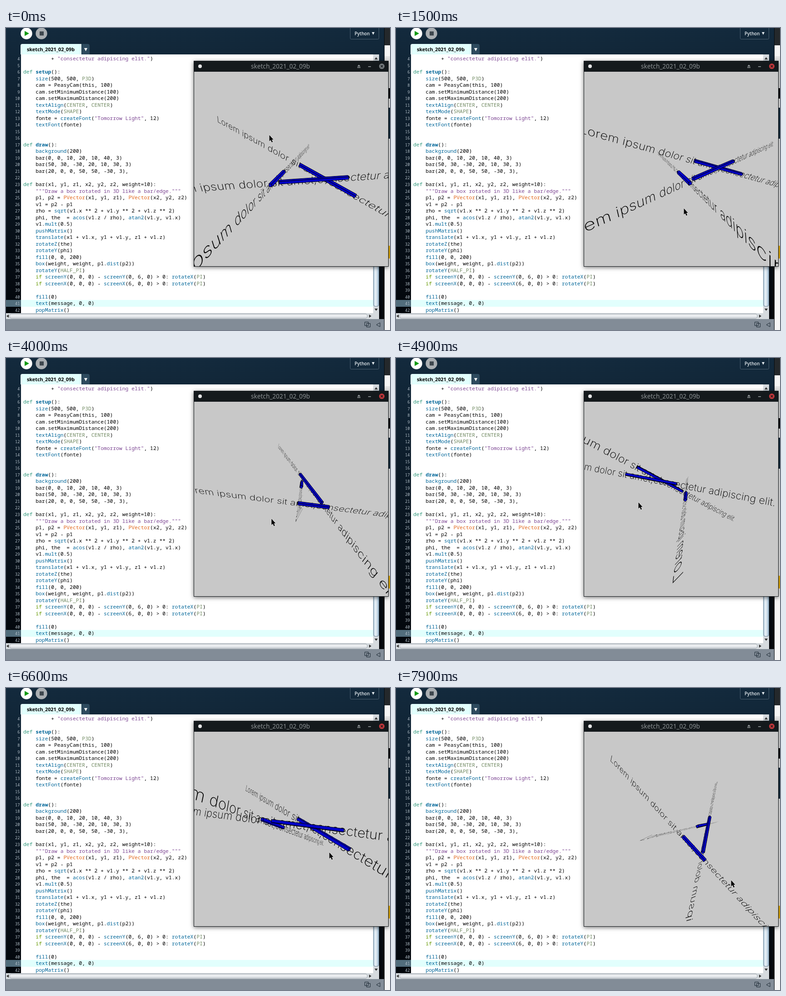
Recreate the animation shown at these times as an HTML page with a canvas. Size 845 px wide and 663 px high, loop 8 s.

```html
<!DOCTYPE html>
<html lang="en">
<head>
<meta charset="utf-8">
<title>Rotating bars with text</title>
<style>
  html, body { margin: 0; width: 100%; height: 100%; overflow: hidden; background: #020408; }
  #stage { position: relative; width: 845px; height: 663px; overflow: hidden; }
  svg { position: absolute; left: 0; top: 0; }
  text { white-space: pre; }
  .ui { font-family: "Open Sans", "Noto Sans", sans-serif; }
  .code { font: 11.35px "Noto Sans Mono", "DejaVu Sans Mono", monospace; }
  .num { font: 8.8px "Noto Sans Mono", "DejaVu Sans Mono", monospace; fill: #b4c0c9; text-anchor: end; }
  .str { fill: #7d4793; }
  .def { fill: #33997e; }
  .main { fill: #006699; font-weight: 700; }
  .if { fill: #669900; }
  .const { fill: #718a62; }
  .type { fill: #e2661a; }
  .fn { fill: #006699; }
  #win { position: absolute; left: 413px; top: 72px; width: 429px; height: 452px;
         background: #14191c; box-shadow: 0 2px 9px rgba(0, 0, 0, .55); }
  canvas { position: absolute; left: 1px; top: 24px; }
</style>
</head>
<body>
<div id="stage">
  <svg width="845" height="663">
    <defs>
      <linearGradient id="bg" x2="0" y2="1">
        <stop stop-color="#132a3d"/><stop offset="1" stop-color="#020408"/>
      </linearGradient>
      <linearGradient id="bar" x2="0" y2="1">
        <stop stop-color="#c3c8cd"/><stop offset=".4" stop-color="#f3f5f7"/><stop offset="1" stop-color="#c4cad0"/>
      </linearGradient>
      <linearGradient id="thumb">
        <stop stop-color="#a9c3d8"/><stop offset=".4" stop-color="#eef5fa"/><stop offset="1" stop-color="#9db9d0"/>
      </linearGradient>
    </defs>
    <rect width="833" height="663" fill="url(#bg)"/>

    <circle cx="45" cy="12" r="12.7" fill="#fff"/>
    <path d="M41 6.5V17.5L51 12Z" fill="#0f9a0f"/>
    <circle cx="78" cy="12" r="12.7" fill="#a9aeb2"/>
    <rect x="74" y="7.5" width="9" height="9" fill="#3d464d"/>
    <rect x="757.5" y="-4" width="63" height="28.5" rx="2" fill="none" stroke="#4d6273"/>
    <text class="ui" x="767" y="15.5" font-size="9.8" font-weight="600" fill="#e6ecf0">Python</text>
    <path d="M805 9h6l-3 6z" fill="#e6ecf0"/>

    <path d="M32 58V39q0-4 4-4H166V58Z" fill="#e2fffd"/>
    <text class="ui" x="46" y="50.5" font-size="10.8" font-weight="700">sketch_2021_02_09b</text>
    <path d="M167 35H180q4 0 4 4V58H167Z" fill="#2d4a5e"/>
    <path d="M172 44h7l-3.5 7z" fill="#fff"/>

    <rect x="33" y="58" width="775" height="568" fill="#fff"/>
    <rect x="0" y="597" width="33" height="15" fill="#526d7c"/>
    <rect x="33" y="597" width="775" height="15" fill="#e2fffd"/>
    <g id="code"></g>

    <rect x="808" y="58" width="13" height="568" fill="#d5dade"/>
    <rect x="808.5" y="72" width="12" height="539" rx="4" fill="url(#thumb)" stroke="#6f8798"/>
    <path d="M811 69h7l-3.5-5zM811 616h7l-3.5 5z" fill="#333"/>

    <rect x="0" y="626" width="821" height="13" fill="#d5dade"/>
    <rect x="8" y="627" width="787" height="11" rx="5" fill="url(#bar)" stroke="#a2aab1"/>
    <path d="M6 629v7l-5-3.5zM799 629v7l5-3.5z" fill="#333"/>
    <rect x="0" y="639" width="833" height="24" fill="#828c97"/>
    <g fill="none" stroke="#1d2a35">
      <path d="M789.5 645.5h8v8h-8zM793.5 648.5h8v8h-8zM823 647v9l-8-4.5z"/>
    </g>

    <rect x="833" y="0" width="12" height="663" fill="#f6f6f6"/>
    <rect x="833" y="0" width="12" height="38" fill="#24282b"/>
    <rect x="833" y="62" width="12" height="70" fill="#e4e4e4"/>
    <rect x="833" y="132" width="12" height="23" fill="#0b0d10"/>
    <rect x="833" y="175" width="12" height="68" fill="#10283b"/>
    <rect x="833" y="478" width="12" height="28" fill="#f2b90c"/>
    <path d="M832.5 0V663" stroke="#05090d"/>
  </svg>

  <div id="win">
    <svg width="429" height="24">
      <circle cx="14" cy="12" r="4" fill="#e4e4e4"/>
      <text x="191" y="17" text-anchor="middle" font-family="Noto Sans, Open Sans, sans-serif" font-size="13.6" fill="#8d9294">sketch_2021_02_09b</text>
      <path d="M360 12.5h7l-3.5-4zM360 14h7v1.5h-7zM384 12h6v1.5h-6z" fill="#9a9fa1"/>
      <circle id="close" cx="414" cy="12" r="6"/>
      <path d="M411.5 9.5l5 5m0-5l-5 5" stroke="#14191c" stroke-width="1.4"/>
    </svg>
    <canvas width="427" height="427"></canvas>
  </div>
</div>

<script>
const source = `         + "consectetur adipiscing elit.")

def setup():
    size(500, 500, P3D)
    cam = PeasyCam(this, 100)
    cam.setMinimumDistance(100)
    cam.setMaximumDistance(200)
    textAlign(CENTER, CENTER)
    textMode(SHAPE)
    fonte = createFont("Tomorrow Light", 12)
    textFont(fonte)


def draw():
    background(200)
    bar(0, 0, 10, 20, 10, 40, 3)
    bar(50, 30, -30, 20, 10, 30, 3)
    bar(20, 0, 0, 50, 50, -30, 3),

def bar(x1, y1, z1, x2, y2, z2, weight=10):
    """Draw a box rotated in 3D like a bar/edge."""
    p1, p2 = PVector(x1, y1, z1), PVector(x2, y2, z2)
    v1 = p2 - p1
    rho = sqrt(v1.x ** 2 + v1.y ** 2 + v1.z ** 2)
    phi, the  = acos(v1.z / rho), atan2(v1.y, v1.x)
    v1.mult(0.5)
    pushMatrix()
    translate(x1 + v1.x, y1 + v1.y, z1 + v1.z)
    rotateZ(the)
    rotateY(phi)
    fill(0, 0, 200)
    box(weight, weight, p1.dist(p2))
    rotateY(HALF_PI)
    if screenY(0, 0, 0) - screenY(0, 6, 0) > 0: rotateX(PI)
    if screenX(0, 0, 0) - screenX(6, 0, 0) > 0: rotateY(PI)

    fill(0)
    text(message, 0, 0)
    popMatrix()`;

// Syntax colouring
const kinds = ['str', 'def', 'main', 'if', 'const', 'type', 'fn'];
const token = /("""[^"]*"""|"[^"]*")|\b(def)\b|\b(setup|draw)\b|\b(if)\b|\b(CENTER|SHAPE|P3D|HALF_PI|PI)\b|\b(PVector)\b|\b(size|text|textAlign|textMode|textFont|createFont|background|sqrt|acos|atan2|mult|pushMatrix|popMatrix|translate|rotate[XYZ]|fill|box|dist|screen[XY])\b/g;
const paint = line => line.replace(/&/g, '&amp;').replace(/</g, '&lt;').replace(token, (word, ...groups) =>
  `<tspan class="${kinds[groups.findIndex(g => g !== undefined)]}">${word}</tspan>`);
document.getElementById('code').innerHTML = source.split('\n').map((line, i) => {
  const y = (71 + i * 14.526).toFixed(2);
  return `<text class="num" x="30.5" y="${y}">${i + 4}</text><text class="code" x="38" y="${y}">${paint(line)}</text>`;
}).join('');

// Vectors and quaternions [w, x, y, z]
const add = (a, b, k = 1) => a.map((v, i) => v + b[i] * k);
const dot = (a, b) => a.reduce((s, v, i) => s + v * b[i], 0);
const unit = a => { const n = Math.hypot(...a); return a.map(v => v / n); };
const cross = (a, b) => [a[1] * b[2] - a[2] * b[1], a[2] * b[0] - a[0] * b[2], a[0] * b[1] - a[1] * b[0]];
function mul([w, ...u], [s, ...v]) {
  return [w * s - dot(u, v), ...add(add(cross(u, v), v, w), u, s)];
}
function turn([w, ...u], v) {
  const t = cross(u, v);
  return add(add(v, t, 2 * w), cross(u, t), 2);
}
function slerp(a, b, k) {
  let c = dot(a, b);
  if (c < 0) { b = b.map(v => -v); c = -c; }
  if (c > .9999) return unit(add(a, add(b, a, -1), k));
  const th = Math.acos(c);
  return add(a.map(v => v * Math.sin((1 - k) * th) / Math.sin(th)), b, Math.sin(k * th) / Math.sin(th));
}

// Scene and camera
const DIST = 200, NEAR = 43.3, FOCAL = 369.8, CX = 213.5, CY = 213.5, LEFT = 414, TOP = 96;
const ends = [[0, 0, 10], [20, 10, 40], [50, 30, -30], [20, 10, 30], [20, 0, 0], [50, 50, -30]];
const bars = [0, 2, 4].map(i => {
  const span = add(ends[i + 1], ends[i], -1), along = unit(span);
  const the = Math.atan2(span[1], span[0]);
  const down = [-Math.sin(the), Math.cos(the), 0];
  return { mid: add(ends[i], span, .5), half: Math.hypot(...span) / 2, along, down, side: cross(down, along) };
});

// Stage positions of the six bar ends in each camera pose
const poses = [
  [611, 316, 581, 345, 753, 329, 602, 339, 647, 300, 769, 368],
  [621, 317, 648, 341, 743, 293, 653, 331, 657, 292, 762, 320],
  [634, 320, 701, 337, 696, 266, 691, 329, 655, 286, 709, 287],
  [636, 311, 636, 296, 531, 239, 634, 292, 616, 276, 505, 255],
  [609, 304, 547, 281, 688, 296, 564, 287, 629, 284, 678, 338],
  [614, 307, 607, 301, 756, 317, 621, 304, 656, 291, 773, 353],
  [633, 326, 679, 378, 687, 284, 674, 361, 661, 304, 688, 298]
].map(orient);

// Finds the orientation that puts the bar ends on the given marks
function orient(marks) {
  const size = ends.reduce((s, p) => s + dot(p, p), 0);
  let best, least = Infinity;
  for (let n = 0; n < 27; n++) {
    let q = unit([1, n % 3 - 1, Math.floor(n / 3) % 3 - 1, Math.floor(n / 9) - 1]), error;
    for (let step = 0; step < 160; step++) {
      let torque = [0, 0, 0];
      error = 0;
      ends.forEach((p, i) => {
        const e = turn(q, p), k = (DIST - e[2]) / FOCAL;
        const off = [(marks[2 * i] - LEFT - CX) * k - e[0], (marks[2 * i + 1] - TOP - CY) * k - e[1], 0];
        torque = add(torque, cross(e, off));
        error += dot(off, off);
      });
      q = unit(mul([1, ...torque.map(v => v / size / 2)], q));
    }
    if (error < least) { least = error; best = q; }
  }
  return best;
}

// [time, pose] and [time, x, y]
const camera = [[0, 0], [200, 0], [1500, 1], [2500, 2], [3300, 2], [3700, 2.12], [3800, 2.12],
  [4900, 3], [6000, 4], [7200, 5], [7900, 6]];
const pointer = [[0, 579, 235], [100, 596, 259], [200, 596, 259], [1500, 633, 396], [2500, 595, 361],
  [3800, 595, 361], [4900, 533, 317], [6000, 750, 388], [7200, 672, 334], [7900, 737, 422]];
function at(track, t) {
  const i = track.findIndex(k => k[0] > t);
  if (i < 0) return track[track.length - 1].slice(1);
  const a = track[i - 1], b = track[i];
  return add(a, add(b, a, -1), (t - a[0]) / (b[0] - a[0])).slice(1);
}

const ctx = document.querySelector('canvas').getContext('2d');
const closeButton = document.getElementById('close');
const message = 'Lorem ipsum dolor sit amet,consectetur adipiscing elit.';
const SCALE = 8, BASE = 4.3, GAP = .08;
const font = `200 ${12 * SCALE}px Inter, Roboto, sans-serif`;
ctx.font = font;
const glyphs = [...message].map(ch => ({ ch, w: ctx.measureText(ch).width / SCALE + GAP }));
const width = glyphs.reduce((s, g) => s + g.w, 0);

const project = e => {
  const k = FOCAL / (DIST - e[2]);
  return [CX + e[0] * k, CY + e[1] * k];
};

function drawText({ mid, along, down }) {
  const origin = project(mid);
  const face = (axis, i) => project(add(mid, axis, 6))[i] < origin[i] ? axis.map(v => -v) : axis;
  const ax = face(along.map(v => -v), 0), ay = face(down, 1);
  let x = -width / 2;
  for (const { ch, w } of glyphs) {
    const m = add(add(mid, ax, x + w / 2), ay, BASE - 3);
    x += w;
    if (DIST - m[2] < NEAR) continue;
    const slope = axis => add(project(add(m, axis, .5)), project(add(m, axis, -.5)), -1).map(v => v / SCALE);
    ctx.setTransform(...slope(ax), ...slope(ay), ...project(m));
    ctx.fillText(ch, (GAP - w) / 2 * SCALE, 3 * SCALE);
  }
  ctx.resetTransform();
}

function drawBox({ mid, half, along, down, side }) {
  const axes = [[side, 1.5], [down, 1.5], [along, half]];
  for (let i = 0; i < 3; i++) for (const s of [-1, 1]) {
    const [n, h] = axes[i], [u, uh] = axes[(i + 1) % 3], [v, vh] = axes[(i + 2) % 3];
    const c = add(mid, n, s * h);
    if (s * dot(n, add([0, 0, DIST], c, -1)) <= 0) continue;
    ctx.beginPath();
    for (const [a, b] of [[-1, -1], [1, -1], [1, 1], [-1, 1]])
      ctx.lineTo(...project(add(add(c, u, a * uh), v, b * vh)));
    ctx.closePath();
    ctx.fill();
    ctx.stroke();
  }
}

function drawPointer([x, y]) {
  ctx.setTransform(1, 0, 0, 1, x - LEFT, y - TOP);
  const arrow = new Path2D('M.5 0V13.5L3.5 11L5.8 16L8 15L5.8 10H9.5Z');
  ctx.strokeStyle = '#e8e8e8';
  ctx.lineWidth = 1.4;
  ctx.stroke(arrow);
  ctx.fillStyle = '#000';
  ctx.fill(arrow);
  ctx.resetTransform();
}

function render(t) {
  const [pose] = at(camera, t), i = Math.min(Math.floor(pose), poses.length - 2);
  const q = slerp(poses[i], poses[i + 1], pose - i);
  const seen = bars.map(b => ({
    half: b.half, mid: turn(q, b.mid), along: turn(q, b.along), down: turn(q, b.down), side: turn(q, b.side)
  })).sort((a, b) => a.mid[2] - b.mid[2]);
  ctx.fillStyle = '#c8c8c8';
  ctx.fillRect(0, 0, 427, 427);
  ctx.font = font;
  ctx.fillStyle = '#000';
  seen.forEach(drawText);
  ctx.fillStyle = '#0000c8';
  ctx.strokeStyle = '#000';
  ctx.lineWidth = .9;
  ctx.lineJoin = 'round';
  seen.forEach(drawBox);
  drawPointer(at(pointer, t));
  closeButton.setAttribute('fill', t < 300 ? '#777c7f' : '#c5383c');
}

let start, shown = -1;
function tick(now) {
  start ??= now;
  const t = Math.floor((now - start) % 8000 / 100) * 100;
  if (t !== shown) render(shown = t);
  requestAnimationFrame(tick);
}
render(0);
requestAnimationFrame(tick);
</script>
</body>
</html>
```
